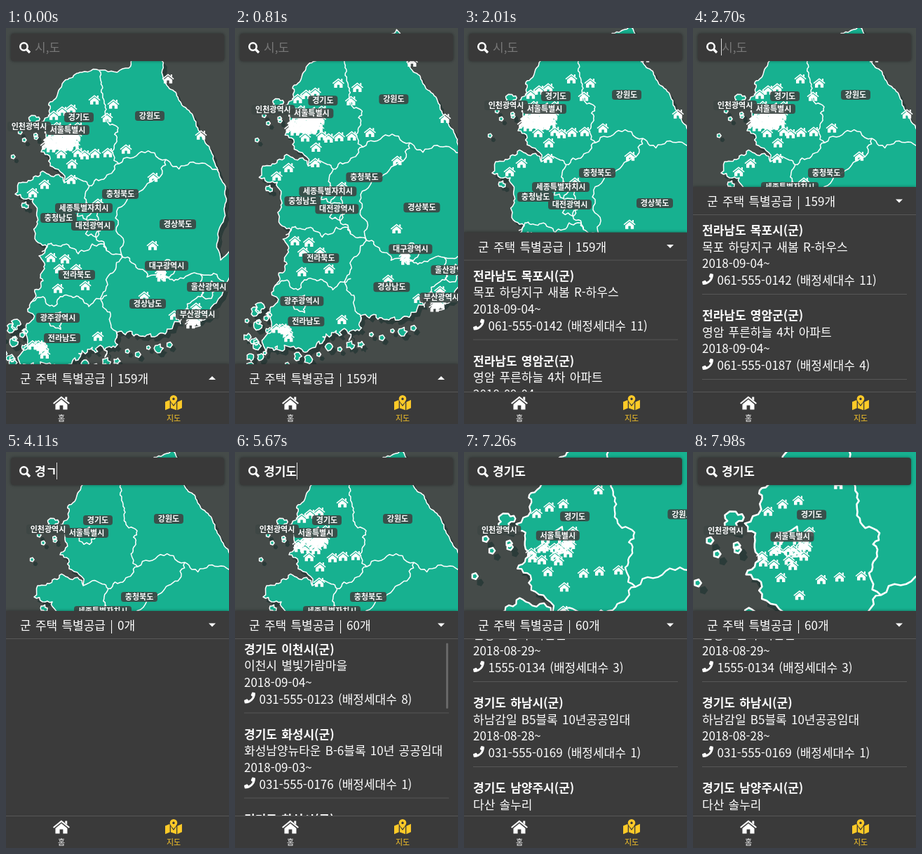
These frames come from a looping animation (318x563 px, 8000 ms). An HTML page:

```html
<!DOCTYPE html>
<html lang="ko">
<meta charset="utf-8">
<style>
html, body { margin: 0; width: 100%; height: 100%; overflow: hidden; background: #454b49; }
svg { display: block; }
text { font: 17px 'Noto Sans CJK KR', 'Noto Sans CJK JP', 'Noto Sans CJK', sans-serif; fill: #fff; word-spacing: 1.5px; white-space: pre; }
.b { font-weight: 700; }
.small { font-size: 11px; text-anchor: middle; }
.tag { font-size: 11px; font-weight: 700; text-anchor: middle; }
.line { stroke: #fff; stroke-width: 1.5; stroke-linejoin: round; }
.up { filter: drop-shadow(0 0 2px #0006); }
</style>
<body>
<svg id="stage" width="318" height="563" viewBox="0 0 318 563">
  <defs>
    <path id="home" d="M0 8 9 .8 18 8 17 9.2 9 2.8 1 9.2ZM13 1.5h2.2v4L13 3.8ZM2.6 9.4 9 4.2 15.4 9.4V15h-4.6v-4.5H7.2V15H2.6Z"/>
    <path id="phone" d="M15.4.8 12 0 11.3.4 9.8 4 10 4.8 12 6.4A11 11 0 0 1 6.4 12L4.8 10 4 9.8.4 11.3 0 12 .8 15.4 1.5 16A14.5 14.5 0 0 0 16 1.5Z"/>
  </defs>
  <rect width="318" height="563" fill="#454b49"/>
  <g id="map"></g>
  <g id="pins" fill="#fff"></g>
  <g id="tags"></g>

  <g id="panel">
    <rect class="up" width="318" height="340" fill="#3b3b3b"/>
    <text id="count" x="20" y="27"></text>
    <path id="arrow" fill="#fff"/>
    <path d="M0 39.5H318" stroke="#575757"/>
    <svg y="40" width="318" height="251">
      <g id="before"></g>
      <g id="after">
        <g id="spinner" fill="none" stroke-width="2.5">
          <circle r="13" stroke="#4c4c4c"/>
          <path d="M0 -13A13 13 0 1 1 -11 7" stroke="#747474"/>
        </g>
      </g>
      <rect id="bar" x="301" width="3" rx="1" fill="#686868"/>
    </svg>
  </g>

  <rect y="517" width="318" height="46" fill="#3a3a3a"/>
  <path d="M0 517.5H318" stroke="#575757"/>
  <use href="#home" fill="#fff" transform="translate(67 522.5) scale(1.33)"/>
  <text class="small" x="79" y="559">홈</text>
  <path fill="#ffca28" fill-rule="evenodd" transform="translate(227 522) scale(1.33)" d="M9 0A4 4 0 0 1 13 4C13 6 10 9.3 9 10.5 8 9.3 5 6 5 4A4 4 0 0 1 9 0ZM9 2.7a1.3 1.3 0 1 0 .01 0ZM0 7.2 4.6 5.3 5 6V14L0 16ZM6 7.5Q7.5 10.3 9 12 10.5 10.3 12 7.5V16L6 14ZM13 7.3 18 5V13.8L13 16Z"/>
  <text class="small" x="239" y="559" style="fill:#ffca28">지도</text>

  <rect class="up" x="7" y="8" width="304" height="39" rx="4" fill="#393939"/>
  <g fill="none" stroke="#fff"><circle cx="25.5" cy="26.5" r="5.2" stroke-width="2.6"/><path d="M29.5 30.5 34 35" stroke-width="3.4"/></g>
  <text id="hint" x="41" y="34" style="fill:#777">시,도</text>
  <text id="query" class="b" x="41" y="34"></text>
  <path id="caret" d="M40.5 15V39" stroke="#ddd"/>
</svg>
<script>
const $ = id => document.getElementById(id);
const show = (id, on) => $(id).style.display = on ? '' : 'none';
const move = (el, x, y, extra = '') => el.setAttribute('transform', `translate(${x} ${y})${extra}`);
const times = (n, make) => Array.from({ length: n }, (_, i) => make(i));

let seed = 77;
const noise = () => (seed = seed * 16807 % 2147483647) / 2147483647 - .5;
const pairs = s => s.split(' ').map(p => p.split(',').map(Number));

// ---- Outlines: key points, refined by random midpoint displacement
function rough(pts, k) {
  for (let pass = 0; pass < 4; pass++) {
    pts = pts.flatMap(([x, y], i) => {
      if (!i) return [[x, y]];
      const [u, v] = pts[i - 1], dx = x - u, dy = y - v, d = noise() * k;
      return Math.hypot(dx, dy) < 5 ? [[x, y]] : [[(x + u) / 2 - dy * d, (y + v) / 2 + dx * d], [x, y]];
    });
  }
  return pts.map(p => p.map(c => c.toFixed(1))).join(' ');
}
const blob = (x, y, r) => 'M' + rough(times(6, i => [x + r * Math.cos(i * Math.PI * .4), y + r * Math.sin(i * Math.PI * .4)]), .7) + 'Z';

const east = '236,-4 254,47 278,80 305,120 329,173 338,227 333,300 345,288 350,305 330,355 318,378';
const south = '318,378 265,394 222,408 185,410 168,438 150,424 130,442 100,450 70,452 50,455';
const west = '50,455 46,436 58,414 50,400 62,361 68,342 82,312 74,294 86,281 69,262 72,240 66,213 40,206 45,190 66,182 88,178 110,190 90,166 77,146 84,124 76,104 90,75';
const north = '90,75 104,56 135,33 202,27 236,-4';
const borders = [
  '160,31 167,74 187,112 180,150 188,163',
  '110,190 145,194 188,163 255,157 265,167 330,172',
  '146,194 140,206 158,245 170,286',
  '255,157 222,200 192,224 192,293',
  '78,288 110,278 130,291 150,277 192,293',
  '192,293 170,338 176,380 185,410',
  '62,361 80,352 95,366 110,350 145,366 171,350',
  '192,293 228,324 272,328 304,320 338,330',
  '304,320 305,352 284,370 276,391'
];

const tags = '경기도,131,97 강원도,232,95 인천광역시,60,110 서울특별시,115,115 충청북도,190,206 충청남도,102,240 세종특별자치시,138,226 대전광역시,151,251 경상북도,272,249 대구광역시,256,308 전라북도,128,321 경상남도,229,362 울산광역시,316,338 부산광역시,300,377 광주광역시,101,382 전라남도,107,411'
  .split(' ').map(s => { const [name, x, y] = s.split(','); return { name, x: +x, y: +y }; });
const inlandCities = tags.filter(p => p.name.endsWith('시') && p.x > 100);

const land = [
  `M${rough(pairs(east), .25)} ${rough(pairs(south), 1)} ${rough(pairs(west), .6)} ${rough(pairs(north), .4)}Z`,
  blob(66, 102, 8), blob(54, 222, 5), blob(37, 153, 3),
  ...times(4, () => blob(58 + noise() * 24, 122 + noise() * 20, 3)),
  ...times(16, () => blob(40 + noise() * 36, 430 + noise() * 90, 5 + noise() * 5)),
  ...times(13, i => blob(80 + i * 15, 468 - i * 4.4 + noise() * 14, 5 + noise() * 5))
].join('');
const inner = borders.map(b => 'M' + rough(pairs(b), .5)).join('') + inlandCities.map(p => blob(p.x, p.y + 4, 13)).join('');
$('map').innerHTML = `<path d="${land}" fill="#2b3b39" stroke="#2b3b39" transform="translate(5 6)"/>
  <path class="line" d="${land}" fill="#17b190"/><path class="line" fill="none" d="${inner}"/>`;

// ---- Pins: lone houses plus loose clusters around the cities
const cluster = (n, x, y, size, local) => times(n, () => ({ x: x + (noise() + noise()) * size, y: y + (noise() + noise()) * size, local }));
const lone = (s, local) => pairs(s).map(([x, y]) => ({ x, y, local }));
const pins = [
  ...lone('153,72 95,94 107,88 120,85 172,147 154,148 139,150 121,163 120,185', true),
  ...cluster(18, 110, 130, 26, true),
  ...cluster(20, 104, 130, 26),
  ...lone('258,42 180,78 171,97 305,122 198,142 237,182 82,192 65,204 158,219 236,279 91,296 111,298 103,312 127,312 101,340 140,336 224,351 298,367 267,378 158,408'),
  ...cluster(4, 248, 319, 7),
  ...cluster(5, 297, 388, 10),
  ...cluster(6, 72, 422, 18)
];
$('pins').innerHTML = pins.map(() => '<use href="#home"/>').join('');
pins.forEach((p, i) => p.el = $('pins').children[i]);

$('tags').innerHTML = tags.map(({ name }) => {
  const w = name.length * 10 + 12;
  return `<g><rect x="${-w / 2}" y="-7" width="${w}" height="14" rx="4" fill="#3d4644" fill-opacity=".9"/><text class="tag" y="4">${name}</text></g>`;
}).join('');
tags.forEach((p, i) => p.el = $('tags').children[i]);

// ---- List
const PITCH = 121;
const item = ([title, name, date, phone, homes], i) => `<g transform="translate(13 ${i * PITCH})">
  <text class="b" y="28">${title}(군)</text><text y="51.5">${name}</text><text y="75">2018-${date}~</text>
  <use href="#phone" y="83" fill="#fff"/><text x="21.5" y="99">${phone} (배정세대수 ${homes})</text>
  <path d="M0 112.5H292" stroke="#575757"/></g>`;
$('before').innerHTML = [
  ['전라남도 목포시', '목포 하당지구 새봄 R-하우스', '09-04', '061-555-0142', 11],
  ['전라남도 영암군', '영암 푸른하늘 4차 아파트', '09-04', '061-555-0187', 4]
].map(item).join('');
$('after').insertAdjacentHTML('afterbegin', [
  ['경기도 이천시', '이천시 별빛가람마을', '09-04', '031-555-0123', 8],
  ['경기도 화성시', '화성남양뉴타운 B-6블록 10년 공공임대', '09-03', '031-555-0176', 1],
  ['경기도 화성시', '화성남양뉴타운 B-8블록', '08-31', '031-555-0158', 2],
  ['경기도 안양시', '안양 B블록 가온들', '08-29', '1555-0134', 3],
  ['경기도 하남시', '하남감일 B5블록 10년공공임대', '08-28', '031-555-0169', 1],
  ['경기도 남양주시', '다산 솔누리', '08-28', '031-555-0115', 2]
].map(item).join(''));
const lateItem = $('after').children[5];

// ---- Timeline
const ZOOM = 1.73, ZX = -57.5, ZY = -78.5;
const LIST_END = 415, LOADED = 6860;
const strokes = ['ㄱ', '겨', '경', '경ㄱ', '경기', '경긷', '경기도'];
const part = (t, a, b) => Math.min(1, Math.max(0, (t - a) / (b - a)));
const swing = p => .5 - Math.cos(Math.PI * p) / 2;
const easeOut = (p, n) => 1 - (1 - p) ** n;

// The first key comes alone, the others follow at an even pace.
function typed(t) {
  if (t < 3360) return '';
  return strokes[t < 3750 ? 0 : Math.min(6, 1 + Math.floor((t - 3750) / 126))];
}

// The caret blinks from the moment the field gets focus, and again after the last key.
function caretOn(t) {
  const since = t < 3360 ? t - 2700 : t < 4380 ? 0 : t - 4305;
  return since >= 0 && Math.floor(since / 520) % 2 === 0;
}

function draw(t) {
  const pan = 1 - easeOut(part(t, 660, 1050), 3.2), zoom = swing(part(t, 6840, 7500));
  const k = 1 + (ZOOM - 1) * zoom, ox = ZX * zoom - 27 * pan, oy = ZY * zoom + 30 * pan;
  const query = typed(t), found = query && '경기도'.startsWith(query);

  move($('map'), ox, oy, ` scale(${k})`);
  for (const p of pins) {
    p.el.style.display = !query || found && p.local ? '' : 'none';
    move(p.el, p.x * k + ox - 8.5, p.y * k + oy - 7.5, ' scale(.95)');
  }
  for (const p of tags) move(p.el, p.x * k + ox, p.y * k + oy);

  move($('panel'), 0, 478 - 252 * swing(part(t, 1680, 2180)));
  $('arrow').setAttribute('d', t < 1700 ? 'M289 22h10l-5-5Z' : 'M289 17.5h10l-5 5Z');
  $('count').textContent = `군 주택 특별공급 | ${!query ? 159 : found ? 60 : 0}개`;

  const scroll = 200 * swing(part(t, 5640, 5890)) + (LIST_END - 200) * easeOut(part(t, 6030, 6330), 2);
  const loaded = t >= LOADED;
  show('before', !query);
  show('after', found);
  move($('after'), 0, -scroll);
  lateItem.style.display = loaded ? '' : 'none';
  show('spinner', !loaded);
  move($('spinner'), 159, 635, ` rotate(${(t - 6390) * .4})`);

  const size = loaded ? 50 : 93;
  $('bar').setAttribute('height', size);
  $('bar').setAttribute('y', 3 + scroll * (loaded ? 81 : 153) / LIST_END);
  $('bar').setAttribute('opacity', t < 5660 ? 0 : 1 - part(t, 6870, 7170));

  show('hint', !query);
  $('query').textContent = query;
  show('caret', caretOn(t));
  move($('caret'), 16 * query.length, 0);
}

function tick(now) {
  draw(now % 8000);
  requestAnimationFrame(tick);
}
draw(0);
requestAnimationFrame(tick);
</script>
</body>
</html>
```
